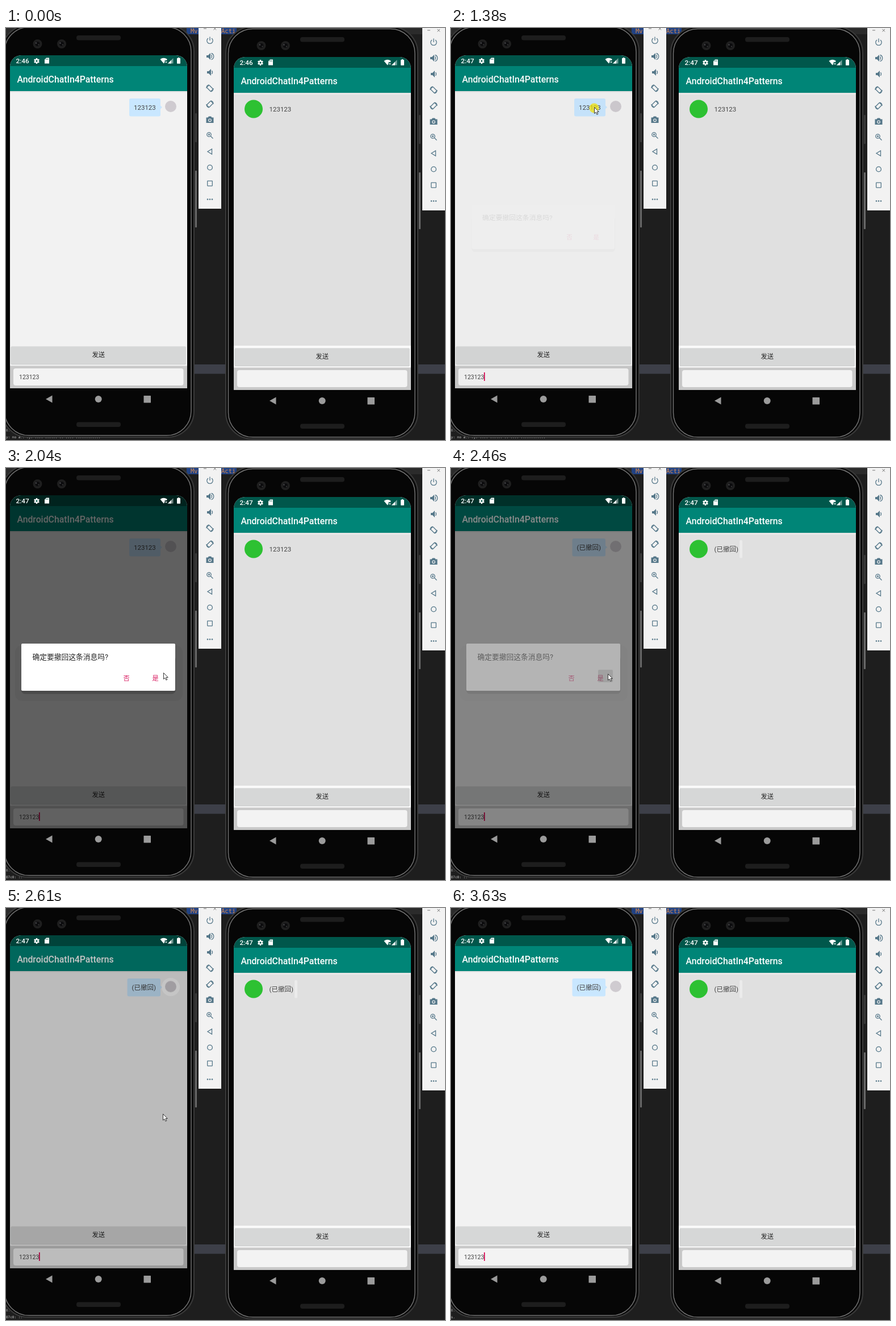
These frames come from a looping animation (773 by 725 pixels, 3730 ms). An HTML page:

```html
<!DOCTYPE html>
<html lang="zh">
<head>
<meta charset="utf-8">
<title>AndroidChatIn4Patterns</title>
<style>
html, body { margin: 0; width: 100%; height: 100%; overflow: hidden; background: #1e1e1e; }
svg { display: block; width: 773px; height: 725px; }
text { font-family: Roboto, "Noto Sans CJK SC", "Noto Sans CJK", sans-serif; white-space: pre; }
.code { font-family: "DejaVu Sans Mono", monospace; }
</style>
</head>
<body>
<svg id="stage" viewBox="0 0 773 725" xmlns="http://www.w3.org/2000/svg"></svg>
<script>
const LOOP = 3730;
const stage = document.getElementById('stage');
const clamp = v => Math.max(0, Math.min(1, v));
const smooth = v => v * v * (3 - 2 * v);

const rect = (x, y, w, h, fill, rx = 0, extra = '') =>
  `<rect x="${x}" y="${y}" width="${w}" height="${h}" rx="${rx}" fill="${fill}" ${extra}/>`;
const circle = (x, y, r, fill, extra = '') =>
  `<circle cx="${x}" cy="${y}" r="${r}" fill="${fill}" ${extra}/>`;
const path = (d, fill, extra = '') => `<path d="${d}" fill="${fill}" ${extra}/>`;
const text = (x, y, size, fill, str, extra = '') =>
  `<text x="${x}" y="${y}" font-size="${size}" fill="${fill}" ${extra}>${str}</text>`;
const at = (x, y, body) => `<g transform="translate(${x} ${y})">${body}</g>`;

const SCREEN = 'M7 634V68a20 20 0 0 1 20-20H299a20 20 0 0 1 20 20V634z';
const INK = '#56788a';
const LINE = `stroke="${INK}" stroke-width="1.3"`;
const MID = 'text-anchor="middle"';

function toolbar() {
  const speaker = path('M-6-2h3l4-4v12l-4-4h-3z', INK);
  const wave = path('M2.4-2.8q2.2 2.8 0 5.6', 'none', LINE);
  const turn = flip => `<g transform="scale(${flip} 1)">` +
    rect(-3, -5, 6, 10, 'none', 1, LINE + ' transform="rotate(-45)"') +
    path('M-6 0A6 6 0 0 1-1.5-6M6 0A6 6 0 0 1 1.5 6', 'none', LINE) + '</g>';
  const icons = [
    [22, path('M-3-4A5.2 5.2 0 1 0 3-4M0-6.5V0', 'none', LINE)],
    [50, speaker + wave + path('M2.5-5.5a5.7 5.7 0 0 1 0 11', 'none', LINE)],
    [78, at(1, 0, speaker + wave)],
    [106, turn(1)],
    [134, turn(-1)],
    [161.5, path('M-6.5-4h3l1.5-2h4l1.5 2h3v9.5h-13z', INK) + circle(0, .8, 2.9, '#f2f2f2') + circle(0, .8, 1.7, INK)],
    [189, circle(-1.5, -1.5, 3.7, 'none', LINE) + path('M1.3 1.3L5.5 5.5M-3.2-1.5h3.4M-1.5-3.2v3.4', 'none', LINE)],
    [217.5, path('M3.5-4.5v9L-4 0z', 'none', LINE)],
    [245.5, circle(0, 0, 4.4, 'none', LINE)],
    [273.5, rect(-4.3, -4.3, 8.6, 8.6, 'none', .5, LINE)],
    [301.5, [-4, 0, 4].map(x => circle(x, 0, 1.3, INK)).join('')]
  ];
  return rect(339, -4, 40, 322, '#f2f2f2') +
    path('M348 1h5M365.5-1l4.5 4.5M370-1l-4.5 4.5', 'none', 'stroke="#777" stroke-width="1"') +
    icons.map(([y, body]) => at(359, y, body)).join('');
}

function statusIcons(side) {
  const teeth = [0, 60, 120].map(a => rect(-1.3, -5, 2.6, 10, '#fff', .4, `transform="rotate(${a})"`)).join('');
  return text(17.5, 62, 11.8, '#fff', '2:46', `id="clock${side}" font-weight="500"`) +
    at(54, 58, teeth + circle(0, 0, 3.6, '#fff') + circle(0, 0, 1.6, '#00574b')) +
    path('M71 52.5h5v10h-8v-7z', '#fff') +
    path('M70.5 54v2M72.3 54v2M74 54v2', 'none', 'stroke="#00574b" stroke-width=".7"') +
    path('M271.5 55q6-4.5 12.5 0l-1.5 2h-3v3l-1.7 2.5z', '#fff') +
    path('M280.5 58.5l3 3m0-3l-3 3', 'none', 'stroke="#fff" stroke-width=".9"') +
    path('M294.5 53v9.5h-9.5z', '#fff', 'opacity=".45"') +
    path('M291 56.5v6h-6z', '#fff') +
    rect(301, 53, 6, 9.7, '#fff', .7) + rect(302.7, 52, 2.6, 2, '#fff');
}

function leftChat() {
  return rect(217, 124, 55, 31.5, '#c9e7ff', 3, 'id="bubble"') +
    path('M272 136.5l3 3-3 3z', '#c9e7ff') +
    text(225, 143.5, 11.5, '#444', '123123', 'id="msgL"') +
    circle(290, 138, 10, '#cfcbd0');
}

function rightChat() {
  return rect(7, 550, 312, 46, '#fafafa') +
    rect(7, 114, 312, 442, '#e0e0e0') +
    rect(114, 124, 5, 31.5, '#ebebeb', 2, 'id="edge"') +
    circle(42, 139.5, 16, '#2dc132') +
    text(69.5, 143.5, 11.5, '#444', '123123', 'id="msgR"');
}

function dialog() {
  return `<g id="dialog">` +
    rect(16, 312, 295, 98, '#000', 12, 'opacity=".04"') +
    rect(26.5, 330, 272.5, 67.5, '#000', 7, 'opacity=".2"') +
    rect(27, 309, 271, 83, '#fff', 2) +
    text(46.5, 337, 12.75, '#222', '确定要撤回这条消息吗?') +
    text(212, 374, 11.2, '#d81b60', '否', MID) +
    text(263, 374, 11.2, '#d81b60', '是', MID) + '</g>' +
    rect(259, 355, 26, 22, '#000', 2, 'id="ripple"');
}

function phone(side) {
  const left = side === 'L';
  const frame = rect(333, 150, 3, 51, '#3a3a3a', 1) +
    rect(333, 251, 3, 100, '#6a6a6a', 1) +
    rect(-7, -5, 338, 725, '#0a0a0a', 46, 'stroke="#3a3a3a" stroke-width="2"') +
    rect(-2.5, -1.5, 328.5, 718.5, '#060606', 43, 'stroke="#757575" stroke-width="1.4"') +
    rect(124, 13, 78, 8.5, '#1d1d1d', 4) + rect(124, 693.5, 78, 8.5, '#1d1d1d', 4) +
    [55.5, 98].map(x => circle(x, 28, 8, '#1f1f1f') + circle(x, 28, 4, '#0c0c0e') +
      circle(x - 2.5, 26.5, 1.2, '#4b4b4f') + circle(x + 2, 29.5, 1, '#444')).join('');
  const app = rect(7, 48, 312, 586, '#f2f2f2') +
    (left ? leftChat() : rightChat()) +
    rect(7, 111, 312, 3, 'url(#shade)') +
    rect(7, 48, 312, 19, '#00574b') + rect(7, 67, 312, 44, '#008577') +
    text(19.5, 95.7, 15.8, '#fff', 'AndroidChatIn4Patterns', 'font-weight="500"') +
    rect(8.5, 561, 308.5, 31.3, '#c4c5c5', 2) + rect(8.5, 560.3, 308.5, 31.2, '#d6d7d7', 2) +
    text(162.7, 579.3, 11.3, '#222', '发送', MID) +
    rect(7, 594.5, 312, 39.5, '#c9c9c9') + rect(13, 599, 299.5, 30, '#f3f3f3', 4) +
    (left ? text(23, 618.2, 10.5, '#444', '123123') +
      rect(58, 606, 1.7, 15, '#d8004f', 0, 'id="caret"') +
      rect(7, 48, 312, 586, '#000', 0, 'id="dim"') +
      circle(290, 139, 13, 'none', 'stroke="#fff" stroke-width="6" id="halo"') : '');
  const nav = path('M81.5 646.5v13L70 653z', '#9b9b9b') + circle(162.7, 653, 6, '#9b9b9b') +
    rect(242.5, 647, 12.5, 12.5, '#9b9b9b', .5);
  return frame + `<g clip-path="url(#screen)">${app}</g>` + statusIcons(side) + nav +
    (left ? dialog() : '') + toolbar();
}

const mono = 'class="code"';
stage.innerHTML = `<defs>
  <clipPath id="screen"><path d="${SCREEN}"/></clipPath>
  <linearGradient id="shade" x1="0" y1="0" x2="0" y2="1">
    <stop stop-color="#000" stop-opacity=".1"/><stop offset="1" stop-color="#000" stop-opacity="0"/></linearGradient>
  </defs>` +
  rect(0, 0, 773, 725, '#1e1e1e') +
  rect(0, 0, 773, 11, '#2b2b2b') +
  rect(318, 0, 88, 11, '#214283') +
  text(325, 8.5, 10.5, '#d98a4e', 'Mv', mono) + text(379, 8.5, 10.5, '#d98a4e', 'Acti', mono) +
  rect(0, 592, 773, 16.5, '#3d3f48') +
  text(0, 710, 6, '#aaa', '0.', mono) +
  text(0, 722, 6, '#ccc', '', mono + ' id="log"') +
  phone('L') + at(394, 3, phone('R')) +
  `<g id="mouse">` + circle(0, 2, 8.5, '#f2e000', 'opacity=".72" id="press"') +
  path('M.5 .5v11l2.6-2.3 1.8 4 1.9-.8-1.8-3.9h3.3z', '#fff', 'stroke="#222" stroke-width=".9"') + '</g>';

const el = {};
stage.querySelectorAll('[id]').forEach(n => el[n.id] = n);
const show = (n, on) => n.setAttribute('visibility', on ? 'visible' : 'hidden');
const alpha = (n, v) => n.setAttribute('opacity', v.toFixed(3));
const within = (t, a, b) => t >= a && t < b;

// time, x, y of the pointer tip
const route = [
  [40, 699, 704], [570, 252, 139], [1580, 252, 139], [1890, 283, 343],
  [2040, 277, 360], [2220, 277, 360], [2270, 276, 362], [2780, 276, 362], [3320, 684, 718]
];

function pointer(t) {
  const i = route.findIndex(p => p[0] > t);
  if (i < 1) return route[i ? route.length - 1 : 0].slice(1);
  const [t0, x0, y0] = route[i - 1], [t1, x1, y1] = route[i];
  const k = smooth((t - t0) / (t1 - t0));
  return [x0 + (x1 - x0) * k, y0 + (y1 - y0) * k];
}

function draw(t) {
  const [x, y] = pointer(t);
  el.mouse.setAttribute('transform', `translate(${x} ${y})`);
  show(el.mouse, within(t, 40, 3380));
  // an explicit "visible" would override the hidden group, so the press mark uses opacity
  alpha(el.press, within(t, 820, 1520) || within(t, 2220, 2350) ? .72 : 0);
  show(el.caret, within(t, 130, 640) || within(t, 1380, 3130) || t >= 3630);

  el.clockL.textContent = t < 1000 ? '2:46' : '2:47';
  el.clockR.textContent = t < 1100 ? '2:46' : '2:47';

  const dim = t < 2000 ? .6 * clamp((t - 1375) / 165)
    : t < 2740 ? .6 * clamp((2763 - t) / 400) : 0;
  alpha(el.dim, dim);
  alpha(el.halo, within(dim, .15, .36) ? .15 : 0);

  const open = clamp((t - 1370) / 104);
  const size = .9 + .1 * (1 - (1 - open) ** 3);
  alpha(el.dialog, open * clamp((2525 - t) / 165));
  el.dialog.setAttribute('transform', `translate(162.5 350.5) scale(${size}) translate(-162.5 -350.5)`);
  alpha(el.ripple, within(t, 2220, 2560) ? .1 : 0);

  const goneL = t >= 2400, goneR = t >= 2450;
  el.msgL.textContent = goneL ? '(已撤回)' : '123123';
  el.msgL.setAttribute('x', goneL ? 221.5 : 225);
  el.bubble.setAttribute('x', goneL ? 213.5 : 217);
  el.bubble.setAttribute('width', goneL ? 58.5 : 55);
  el.msgR.textContent = goneR ? '(已撤回)' : '123123';
  show(el.edge, goneR);

  el.log.textContent = t < 1800 ? 'y: no a.. .y. .... ...... .. .... ............'
    : t < 2690 ? '07c0: ::' : 's.';
}

let start;
function tick(now) {
  if (start === undefined) start = now;
  draw((now - start) % LOOP);
  requestAnimationFrame(tick);
}
draw(0);
requestAnimationFrame(tick);
</script>
</body>
</html>
```
